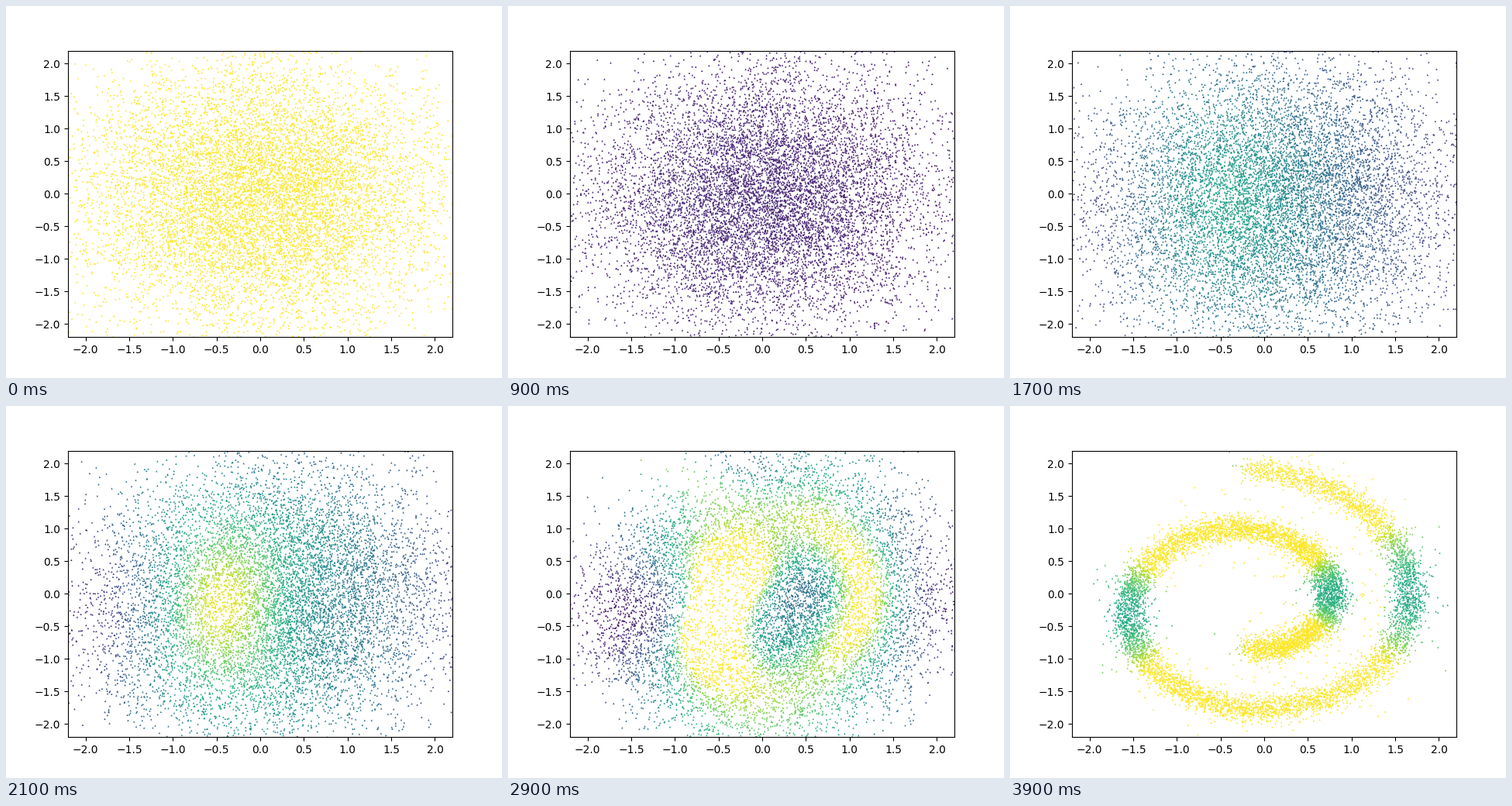
A matplotlib script that plays this animation: 640x480 px, repeating every 4 s.

```python
import numpy as np
import matplotlib.pyplot as plt
from matplotlib.animation import FuncAnimation

STEPS = 40
POINTS = 10000
NODES = 240
BAND = 0.075      # width of the spiral's arms
SHIFT = np.array([-0.17, -0.15])

rng = np.random.default_rng(4)


def spiral(u):
    angle = 1.5 * np.pi * (1 + 2 * u)
    curve = np.column_stack([np.cos(angle), np.sin(angle)])
    return 0.146 * angle[:, None] * curve + SHIFT


def kept_signal(t):
    """Share of the clean variance left after t noising steps."""
    return np.exp(-0.0013 * (t * t + 2 * t) * (1 + (t / 34) ** 4))


def make_path():
    """Noise the spiral step by step; the animation plays this backwards."""
    width = np.where(rng.random(POINTS) < 0.06, 0.25, BAND)
    pos = spiral(rng.random(POINTS))
    pos = pos + width[:, None] * rng.standard_normal(pos.shape)
    path = [pos]
    for t in range(1, STEPS + 1):
        keep = kept_signal(t) / kept_signal(t - 1)
        noise = rng.standard_normal(pos.shape)
        pos = np.sqrt(keep) * pos + np.sqrt(1 - keep) * noise
        path.append(pos)
    return path


def spread_x(pos, t):
    """Horizontal uncertainty of the clean point, relative to the noise."""
    signal = kept_signal(t)
    noise = 1 - signal
    a = np.sqrt(signal)
    total = signal * BAND ** 2 + noise
    soft = total + 0.02 * np.exp(-(t - 1) / 2)
    centers = a * nodes
    dist = ((pos ** 2).sum(1)[:, None] + (centers ** 2).sum(1)
            - 2 * pos @ centers.T)
    dist -= dist.min(axis=1, keepdims=True)
    weight = np.exp(-dist / (2 * soft))
    x = nodes[:, 0]
    moments = weight @ np.column_stack([np.ones(NODES), x, x * x])
    mean = moments[:, 1] / moments[:, 0]
    between = moments[:, 2] / moments[:, 0] - mean ** 2
    within = BAND ** 2 * noise / total
    variance = within + (noise / total) ** 2 * between
    return np.clip(signal * variance / noise, 0, 1)


nodes = spiral((np.arange(NODES) + 0.5) / NODES)
path = make_path()

fig, ax = plt.subplots(figsize=(6.4, 4.8), dpi=100)
ax.set_xlim(-2.2, 2.2)
ax.set_ylim(-2.2, 2.2)
dots = ax.scatter(*path[STEPS].T, c=np.ones(POINTS), cmap="viridis",
                  vmin=0, vmax=1, s=3, marker="^", linewidths=0)


def draw(frame):
    t = STEPS - frame
    dots.set_offsets(path[t])
    # The sampler starts from pure noise at full spread.
    dots.set_array(np.ones(POINTS) if frame == 0 else spread_x(path[t], t))
    return (dots,)


anim = FuncAnimation(fig, draw, frames=STEPS, interval=100,
                     repeat=True, repeat_delay=0, blit=False)
plt.show()
```
